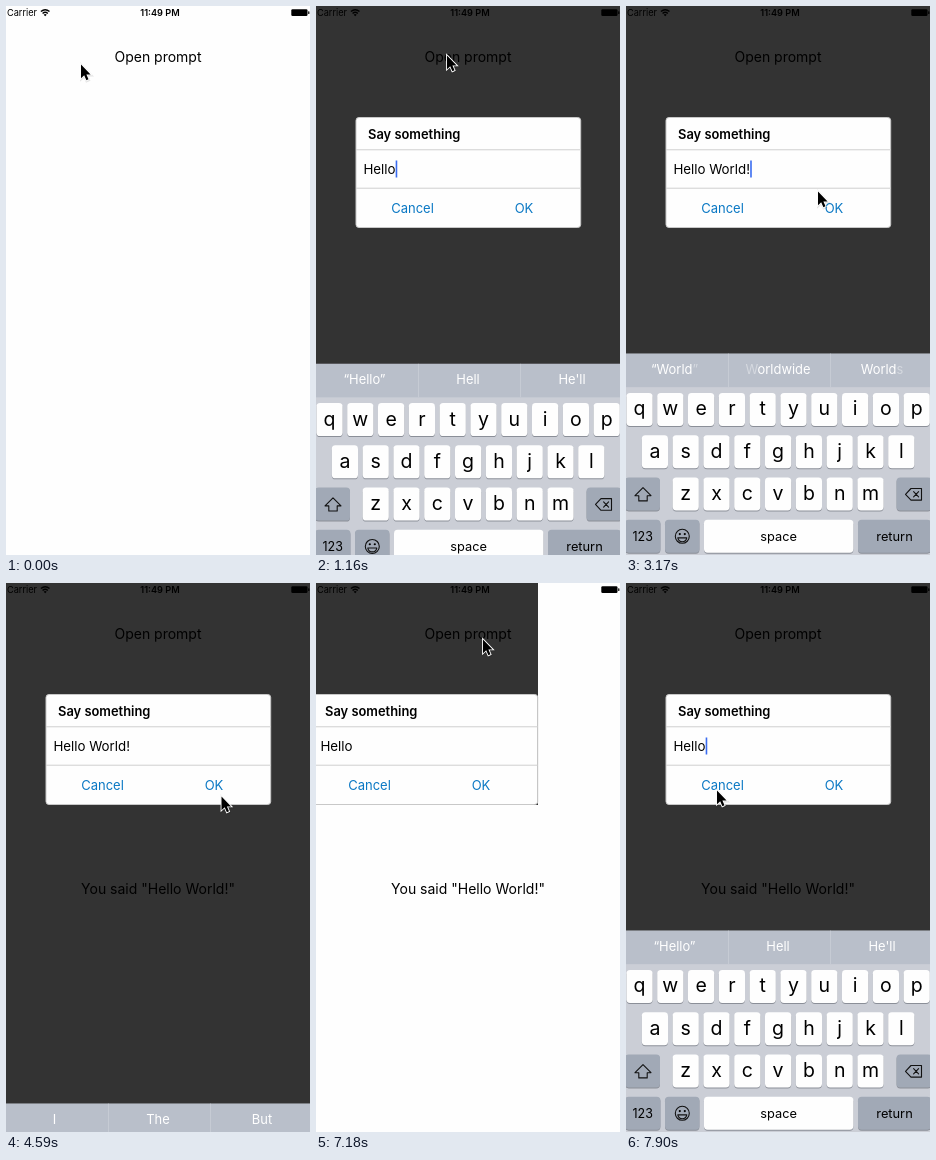
These frames come from a looping animation (304 by 549 pixels, 7.99 s). An HTML page:

```html
<!DOCTYPE html>
<html lang="en">
<head>
<meta charset="utf-8">
<title>Prompt dialog</title>
<style>
html, body { margin: 0; width: 100%; height: 100%; overflow: hidden; background: #fefefe; }
svg { display: block; width: 304px; height: 549px; font-family: Inter, Roboto, sans-serif; }
text { white-space: pre; }
.mid { text-anchor: middle; }
.line { fill: none; stroke: #111; stroke-width: 1.1; stroke-linejoin: round; stroke-linecap: round; }
</style>
</head>
<body>
<svg viewBox="0 0 304 549">
  <rect width="304" height="549" fill="#fefefe"/>
  <g id="page">
    <text x="1" y="10" font-size="9.2">Carrier</text>
    <g fill="none" stroke="#000" stroke-width="1.4">
      <path d="M34.9 5.6Q39.2 1.7 43.5 5.6"/>
      <path d="M36.6 7.5Q39.2 5.2 41.8 7.5"/>
    </g>
    <path d="M37.7 8.7Q39.2 7.5 40.7 8.7L39.2 10.3Z"/>
    <text class="mid" x="154" y="10" font-size="9.2" font-weight="600">11:49 PM</text>
    <rect x="285.3" y="3.2" width="16.2" height="6.8" rx="1.2"/>
    <rect x="302.2" y="5.2" width="1.2" height="2.8" rx=".5"/>
    <text class="mid" x="152" y="55.5" font-size="14">Open prompt</text>
    <text id="said" class="mid" x="152" y="310.5" font-size="14">You said "Hello World!"</text>
  </g>
  <g id="modal">
    <rect id="shade" fill="#000" fill-opacity=".8"/>
    <g id="dialog">
      <rect x="40" y="111.5" width="224.7" height="110" rx="3" fill="#fefefe" stroke="#c8c8c8"/>
      <path d="M40 143.8H264.7M40 182.2H264.7" stroke="#cfcfcf"/>
      <text x="52" y="132.6" font-size="12.9" font-weight="600">Say something</text>
      <text id="field" x="47.4" y="167.6" font-size="13.3"></text>
      <rect id="caret" y="154.5" width="1.6" height="17" fill="#3a6cf0"/>
      <g class="mid" font-size="13" fill="#0a78c4">
        <text x="96.5" y="206.7">Cancel</text>
        <text x="208" y="206.7">OK</text>
      </g>
    </g>
    <g id="keyboard">
      <rect width="304" height="202" fill="#cbced6"/>
      <rect width="304" height="33.5" fill="#b9bfca"/>
      <path d="M102.5 0V33.5M204.5 0V33.5" stroke="#c6cbd4"/>
      <g id="hints" class="mid" font-size="12.9" fill="#fff">
        <text x="48.5" y="20.2"></text>
        <text x="152" y="20.2"></text>
        <text x="256" y="20.2"></text>
      </g>
      <g id="keys" class="mid"></g>
      <path class="line" d="M17 134L25 142H21.2V147.2H12.8V142H9Z"/>
      <path class="line" d="M279.5 140.6L285 134.8H295.5V146.4H285Z M287.6 138L292.6 143.2M292.6 138L287.6 143.2"/>
      <circle class="line" cx="56.3" cy="182.6" r="7"/>
      <path d="M51.8 184.2H60.8Q60 188 56.3 188T51.8 184.2Z" class="line"/>
      <circle cx="53.8" cy="180.4" r="1.1"/><circle cx="58.8" cy="180.4" r="1.1"/>
    </g>
  </g>
  <g id="cursor">
    <path d="M1.2 2V16L4.4 13.1L6.6 18.1L8.9 17.1L6.8 12.3H11.2Z" fill="#000" fill-opacity=".15" stroke="#000" stroke-opacity=".1" stroke-width="2.4"/>
    <path d="M1 1.4V15.2L4.2 12.2L6.4 17.2L8.5 16.3L6.4 11.4H10.6Z" stroke="#fff" stroke-width="1.8" paint-order="stroke"/>
  </g>
</svg>
<script>
const LOOP = 7990, TICKS = 90, TICK = LOOP / TICKS;
const el = Object.fromEntries([...document.querySelectorAll('[id]')].map(n => [n.id, n]));
const show = (node, on) => node.setAttribute('visibility', on ? 'visible' : 'hidden');
const move = (node, x, y) => node.setAttribute('transform', `translate(${x} ${y})`);

// Keyboard layout, relative to the top of the hint bar
const rowTop = r => 39.2 + r * 42.25;
function key(x, r, w, label, size, dark) {
  const y = rowTop(r), h = 33;
  const box = (dy, fill) => `<rect x="${x}" y="${y + dy}" width="${w}" height="${h}" rx="3.6" fill="${fill}"/>`;
  const base = y + h / 2 + (size > 15 ? 6 : 4.7);
  el.keys.insertAdjacentHTML('beforeend', box(1, '#8b8f98') + box(0, dark ? '#a1a9b6' : '#fefefe') +
    `<text x="${x + w / 2}" y="${base}" font-size="${size}">${label}</text>`);
}
['qwertyuiop', 'asdfghjkl', 'zxcvbnm'].forEach((row, r) =>
  [...row].forEach((c, i) => key([0.4, 15.8, 46.6][r] + i * 30.8, r, 26.2, c, 19.5)));
key(-1, 2, 35, '', 13, true);
key(270.6, 2, 35, '', 13, true);
key(-1, 3, 35.4, '123', 12.5, true);
key(39, 3, 34.4, '', 13, true);
key(78, 3, 149.4, 'space', 12.8);
key(232, 3, 73, 'return', 12.8, true);

// [tick, x, y] of the pointer tip
const path = [
  [0, 74, 57], [7, 130, 48], [33, 130, 48], [36, 191, 184], [39, 214.5, 212],
  [62, 214.5, 212], [63, 215.5, 212], [65, 193, 495], [68, 193, 495], [69, 195, 531],
  [73, 163, 94], [74, 163, 94], [79, 166, 55], [83, 166, 55], [89, 90, 206]
];
function pointer(k) {
  const i = Math.max(1, path.findIndex(p => p[0] >= k));
  const [a, ax, ay] = path[i - 1], [b, bx, by] = path[i];
  const u = (k - a) / (b - a), e = u * u * (3 - 2 * u);
  return [ax + (bx - ax) * e, ay + (by - ay) * e];
}

// Ticks at which each character of " World!" is typed
const typed = [21, 23, 25, 27, 29, 31, 34];
const fieldText = k => 'Hello' + (k > 80 ? '' : ' World!'.slice(0, typed.filter(t => t <= k).length));

// Text between bars is half faded
const idle = ['I', 'The', 'But'];
const hintSets = [
  [0, ['“Hello”', 'Hell', "He'll"]],
  [22, idle],
  [24, ['“W”', 'We', 'What']],
  [26, ['“Wo”', 'Would', 'Work']],
  [28, ['“Wor”', 'Work', 'World']],
  [30, ['“Worl”', 'World', 'Worlds']],
  [34, ['“World|”', '|W|orldwide', 'World|s']],
  [38, idle],
  [80, ['“Hello”', 'Hell', "He'll"]]
];
const spans = s => s.split('|').map((p, i) => i % 2 ? `<tspan fill-opacity=".4">${p}</tspan>` : p).join('');

function caretAlpha(k) {
  if (k < 42 || k >= 48) return 1;
  return k < 45 ? (44 - k) / 3 : k < 47 ? 0 : 0.5;
}

// How far the keyboard sits below its resting place, n ticks after opening
function keyboardDrop(k, n) {
  if (k >= 51 && k < 54) return [70, 173, 202][k - 51];
  return n < 2 ? 202 : n > 7 ? 0 : 201 * Math.exp(-(n - 1.65) * 1.27);
}

let last = -1;
function draw(k) {
  const open = (k >= 9 && k < 54) || k >= 81;
  const n = k - (k >= 81 ? 81 : 9);
  const entering = n === 0;
  show(el.modal, open);
  show(el.said, k >= 51);
  const [x, y] = pointer(k);
  move(el.cursor, x, y);
  if (!open) return;
  el.shade.setAttribute('width', entering ? 222 : 304);
  el.shade.setAttribute('height', entering ? 222 : 549);
  move(el.dialog, entering ? -43 : 0, 0);
  el.field.textContent = fieldText(k);
  el.caret.setAttribute('x', 47.6 + el.field.getComputedTextLength());
  el.caret.setAttribute('opacity', n < 2 || (k >= 51 && k < 81) ? 0 : caretAlpha(k));
  move(el.keyboard, 0, 347.7 + keyboardDrop(k, n));
  const hints = hintSets.filter(h => h[0] <= k).pop()[1];
  hints.forEach((s, i) => { el.hints.children[i].innerHTML = spans(s); });
}

function frame() {
  const k = Math.floor((performance.now() % LOOP + 30) / TICK) % TICKS;
  if (k !== last) draw(last = k);
  requestAnimationFrame(frame);
}
draw(0);
frame();
</script>
</body>
</html>
```
